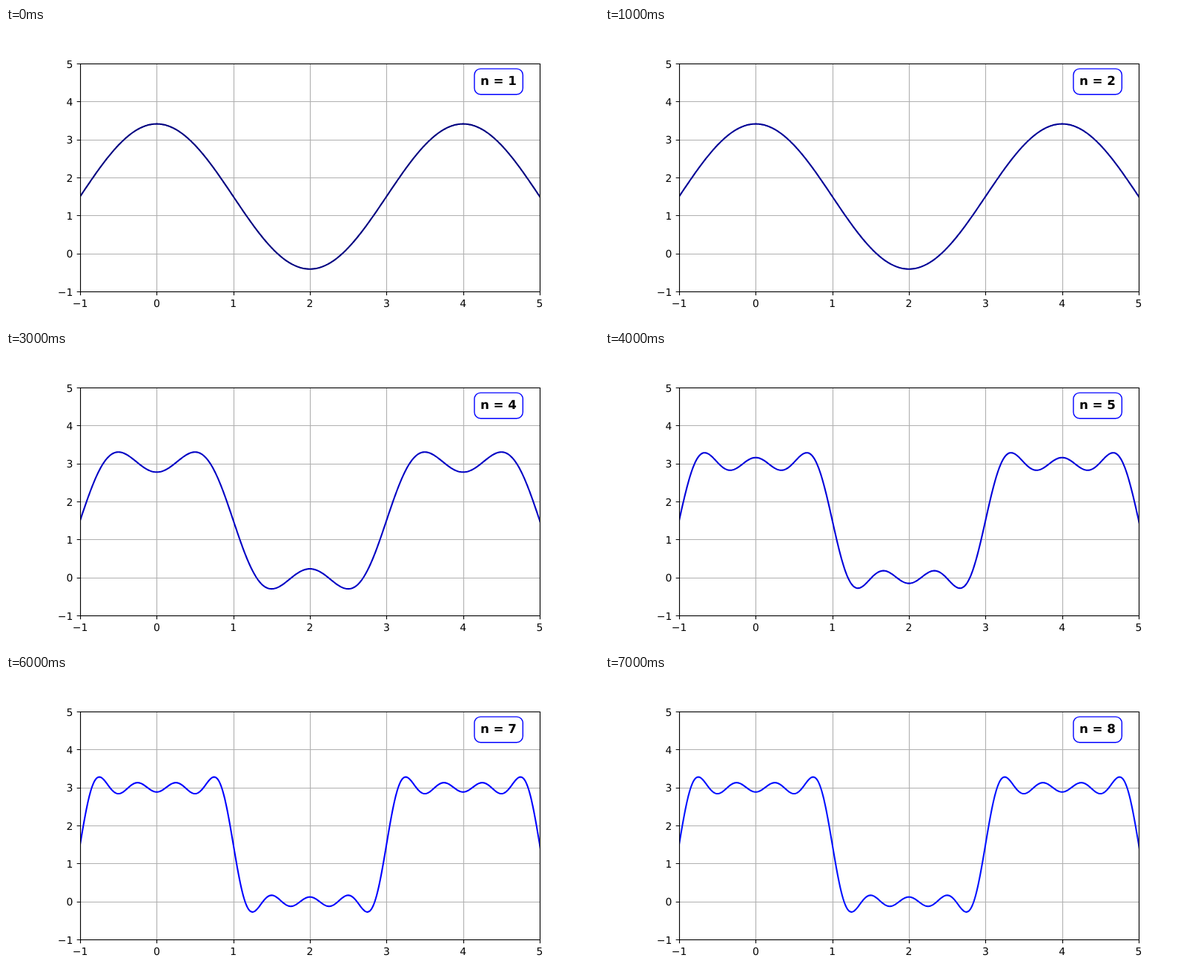
Write an HTML page that moves like this. It is 800x400 px and loops after 8 s.

```html
<!DOCTYPE html>
<html lang="en">
<head>
<meta charset="utf-8">
<title>Fourier partial sums</title>
<style>
  html, body { margin: 0; width: 100%; height: 100%; overflow: hidden; background: #fff; }
  svg { display: block; }
  text { font: 13.889px "DejaVu Sans", sans-serif; text-rendering: geometricPrecision; }
  .mid { text-anchor: middle; }
  .end { text-anchor: end; }
  #label { font-size: 16.667px; font-weight: bold; }
  .grid { stroke: #b0b0b0; stroke-width: 1.11; }
  .axis { stroke: #000; stroke-width: 1.11; fill: none; }
  #curve { fill: none; stroke-width: 2.083; stroke-linejoin: round; }
</style>
</head>
<body>
<svg width="800" height="400" viewBox="0 0 800 400">
  <clipPath id="plot"><rect x="100" y="48" width="621" height="309"/></clipPath>
  <g id="grid" class="grid"></g>
  <path id="curve" clip-path="url(#plot)"/>
  <g id="ticks"></g>
  <rect class="axis" x="100.5" y="48.5" width="620" height="308"/>
  <rect x="631.9" y="55.1" width="65.4" height="34.6" rx="8.33" fill="#fff" stroke="#00f" stroke-width="1.39"/>
  <text id="label" class="mid" x="664.4" y="77">n = 1</text>
</svg>
<script>
  const STEP = 1000, COUNT = 8;
  const $ = id => document.getElementById(id);
  const px = x => 100 + (x + 1) * 620 / 6;
  const py = y => 356 - (y + 1) * 308 / 6;
  const snap = v => Math.round(v) + 0.5;

  function add(parent, tag, attrs, text = "") {
    const el = document.createElementNS("http://www.w3.org/2000/svg", tag);
    for (const key in attrs) el.setAttribute(key, attrs[key]);
    el.textContent = text;
    $(parent).appendChild(el);
  }

  for (let v = -1; v <= 5; v++) {
    const x = snap(px(v)), y = snap(py(v));
    const name = String(v).replace("-", "\u2212");
    add("grid", "path", { d: `M${x} 48V356M100 ${y}H720` });
    add("ticks", "path", { class: "axis", d: `M${x} 356.5v4.86M100.5 ${y}h-4.86` });
    add("ticks", "text", { class: "mid", x: px(v), y: 377 }, name);
    add("ticks", "text", { class: "end", x: 90.3, y: Math.round(py(v) + 5.5) }, name);
  }

  // Square wave of height 3 and period 4, odd harmonics up to n
  function wave(x, n) {
    let sum = 1.5;
    for (let k = 1, sign = 1; k <= n; k += 2, sign = -sign)
      sum += sign * 6 / (Math.PI * k) * Math.cos(k * Math.PI * x / 2);
    return sum;
  }

  function curvePath(n) {
    const points = [];
    for (let i = 0; i <= 601; i++) {
      const x = -1 + i / 100;
      points.push(px(x).toFixed(2) + " " + py(wave(x, n)).toFixed(2));
    }
    return "M" + points.join("L");
  }

  // Dark blue rising to pure blue, then gaining green
  function color(n) {
    const v = Math.floor((n - 1) * 256 / 49) / 255;
    const blue = Math.min(1, 0.5 + 0.5 * v / 0.11);
    const green = Math.max(0, (v - 0.125) / 0.25);
    return `rgb(0,${Math.round(green * 255)},${Math.round(blue * 255)})`;
  }

  let shown = 0;
  function show(n) {
    if (n === shown) return;
    shown = n;
    $("curve").setAttribute("d", curvePath(n));
    $("curve").setAttribute("stroke", color(n));
    $("label").textContent = "n = " + n;
  }

  const start = performance.now();
  function tick() {
    const t = performance.now() - start;
    show(Math.floor(t / STEP) % COUNT + 1);
    requestAnimationFrame(tick);
  }
  show(1);
  requestAnimationFrame(tick);
</script>
</body>
</html>
```
